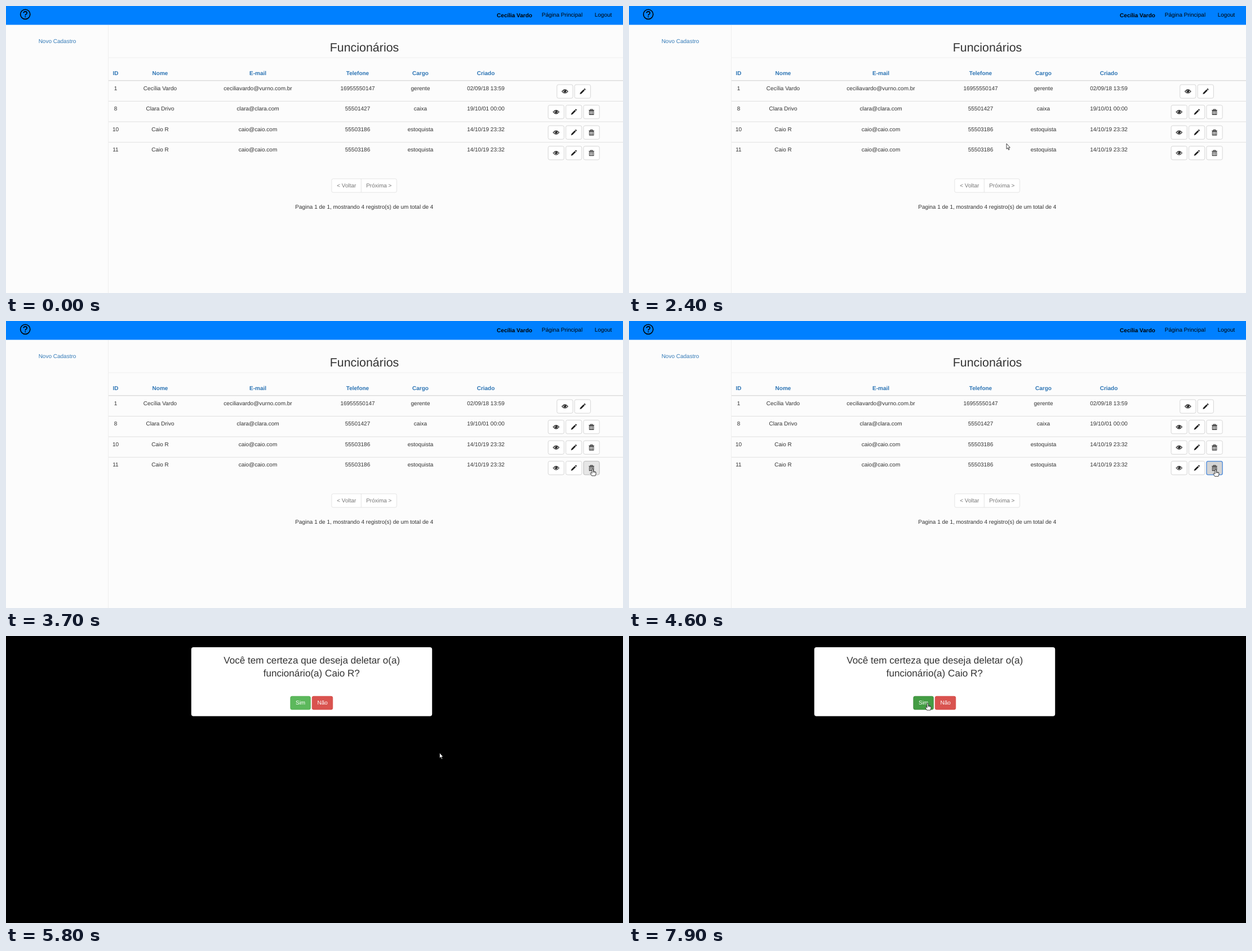
An HTML page for the animation above (8000 ms loop, 1095 px wide and 511 px high).

```html
<!DOCTYPE html>
<html lang="pt-BR">
<head>
<meta charset="utf-8">
<title>Funcionários</title>
<style>
  html, body { margin: 0; width: 100%; height: 100%; overflow: hidden; background: #fcfcfc; }
  svg { display: block; width: 1095px; height: 511px; }
  text { font: 10px "Liberation Sans", Arial, sans-serif; fill: #333; text-anchor: middle; text-rendering: geometricPrecision; }
  .bold { font-weight: bold; }
  .head { font-weight: bold; fill: #2c74b4; }
  .link { fill: #337ab7; }
  .bar { fill: #000; }
  .muted { fill: #777; }
  .light { fill: #fff; }
  .title { font-size: 21.4px; }
  .question { font-size: 17.12px; }
  .button { fill: #fff; stroke: #ccc; stroke-width: .8; }
  .button.hover { fill: #e6e6e6; stroke: #adadad; }
  .button.pressed { fill: #d4d4d4; stroke: #5b93dc; stroke-width: 1.5; }
  .yes { fill: #5cb85c; stroke: #4cae4c; stroke-width: .7; }
  .yes.hover { fill: #449d44; stroke: #398439; }
  .no { fill: #d9534f; stroke: #d43f3a; stroke-width: .7; }
  .no.hover { fill: #c9302c; stroke: #ac2925; }
  .pointer { fill: #fff; stroke: #111; stroke-width: .8; stroke-linejoin: round; }
</style>
</head>
<body>
<svg id="stage" viewBox="0 0 1095 511" xmlns="http://www.w3.org/2000/svg"></svg>
<script>
const LOOP = 8000, STEP = 100, DIALOG_AT = 4700, PRESS_AT = 4600, ENTER_AT = 600;

const columns = [194.5, 273.5, 447, 624, 735.5, 851.5];
const headings = ['ID', 'Nome', 'E-mail', 'Telefone', 'Cargo', 'Criado'];
const rows = [
  ['1', 'Cecília Vardo', 'ceciliavardo@vurno.com.br', '16955550147', 'gerente', '02/09/18 13:59'],
  ['8', 'Clara Drivo', 'clara@clara.com', '55501427', 'caixa', '19/10/01 00:00'],
  ['10', 'Caio R', 'caio@caio.com', '55503186', 'estoquista', '14/10/19 23:32'],
  ['11', 'Caio R', 'caio@caio.com', '55503186', 'estoquista', '14/10/19 23:32']
];

// Cursor stops: time, x, y
const path = [
  [600, 470, 1], [1000, 428, 172], [1100, 428, 172], [1200, 425, 193.5],
  [1500, 585, 248], [1700, 655, 245], [2300, 655, 245], [2500, 685, 245],
  [2600, 685, 245], [2700, 800, 262], [2800, 901, 273], [3000, 901, 273],
  [3100, 913.5, 274.5], [3700, 1041, 263], [3900, 1042, 263], [4100, 1041, 263],
  [4200, 1041, 264], [5200, 1041, 264], [5300, 1040, 264], [5400, 1040, 264],
  [5800, 769.5, 208], [5900, 769.5, 208], [6400, 581, 134], [6600, 581, 134],
  [6700, 580, 134], [6800, 580, 134], [6900, 572.5, 131.5], [7100, 562, 120],
  [7500, 562, 120], [7900, 530, 119.5]
];

const text = (x, y, content, cls = '') => `<text x="${x}" y="${y}" class="${cls}">${content}</text>`;
const rule = (x1, y, color, width) =>
  `<path d="M${x1} ${y}H1095" stroke="${color}" stroke-width="${width}"/>`;
const box = (x, y, w, h, cls) =>
  `<rect x="${x}" y="${y}" width="${w}" height="${h}" rx="2.8" class="${cls}"/>`;

const icons = {
  eye: `<path d="M-5.2 0Q0-6.4 5.2 0Q0 6.4-5.2 0Z" fill="none" stroke="#222" stroke-width="1.1"/>
    <circle cy="-.4" r="2.5" fill="#222"/><circle cx="-.8" cy="-1.2" r=".7" fill="#fff"/>`,
  pencil: `<path d="M-5 5L-4.1 2.1L1.6-3.6L3.6-1.6L-2.1 4.1ZM2.2-4.2L3.1-5.1Q3.7-5.5 4.3-4.9L4.9-4.3Q5.5-3.7 5.1-3.1L4.2-2.2Z" fill="#222"/>`,
  trash: `<path d="M-4.8-3.2H4.8M-1.8-3.4V-4.7H1.8V-3.4M-3.7-1.8V4.7H3.7V-1.8ZM-1.3-1V4M1.3-1V4" fill="none" stroke="#333" stroke-width="1.1"/>`
};

const actionButton = (icon, x, y) =>
  box(x, y, 28.2, 24.2, 'button') + `<g transform="translate(${x + 14.1} ${y + 12.1})">${icons[icon]}</g>`;

function tableRow(cells, i) {
  const top = 133 + i * 36.55;
  const names = i ? ['eye', 'pencil', 'trash'] : ['eye', 'pencil'];
  const left = i ? 962.2 : 977.8;
  return (i ? rule(182, top, '#ddd', .9) : '') +
    cells.map((cell, c) => text(columns[c], top + 16.7, cell)).join('') +
    names.map((name, n) => actionButton(name, left + n * 31.4, top + 7)).join('');
}

const listing = `<g id="listing">
  <rect width="1095" height="511" fill="#fcfcfc"/>
  <rect width="1095" height="33.5" fill="#0080ff"/>
  <circle cx="34.2" cy="14.8" r="8.6" fill="none" stroke="#000" stroke-width="1.6"/>
  <path d="M31.2 12.6Q31.2 9.9 34.2 9.9T37.2 12.5Q37.2 14 35.5 14.8Q34.2 15.5 34.2 17" fill="none" stroke="#000" stroke-width="1.6"/>
  <circle cx="34.2" cy="19.2" r="1" fill="#000"/>
  ${text(902.5, 19.8, rows[0][1], 'bar bold')}
  ${text(987, 18.8, 'Página Principal', 'bar')}
  ${text(1060, 18.8, 'Logout', 'bar')}
  ${text(91, 65.6, 'Novo Cadastro', 'link')}
  <path d="M181.5 34V511" stroke="#eee" stroke-width=".9"/>
  ${text(636, 81, 'Funcionários', 'title')}
  ${rule(182, 92, '#eee', .9)}
  ${headings.map((h, c) => text(columns[c], 122.6, h, 'head')).join('')}
  ${rule(182, 132.7, '#ddd', 1.5)}
  ${rows.map(tableRow).join('')}
  <rect x="577.9" y="307.7" width="115.6" height="24.2" rx="2.8" fill="#fff" stroke="#ddd" stroke-width=".8"/>
  <path d="M630.3 307.7V331.9" stroke="#ddd" stroke-width=".8"/>
  ${text(604.3, 323.2, '&lt; Voltar', 'muted')}
  ${text(661.8, 323.2, 'Próxima &gt;', 'muted')}
  ${text(635.8, 360.9, 'Pagina 1 de 1, mostrando 4 registro(s) de um total de 4')}
</g>`;

const dialog = `<g id="dialog">
  <rect width="1095" height="511" fill="#000"/>
  <rect x="328.8" y="20" width="427.4" height="122.8" rx="4" fill="#fff"/>
  <path d="M332 142.4H753" stroke="#bbb" stroke-width=".8"/>
  ${text(542.7, 48.6, 'Você tem certeza que deseja deletar o(a)', 'question')}
  ${text(542.3, 72.4, `funcionário(a) ${rows[3][1]}?`, 'question')}
  ${box(504.8, 107.3, 35.6, 23.7, 'yes')}
  ${box(543.2, 107.3, 36.6, 23.7, 'no')}
  ${text(522.6, 122.3, 'Sim', 'light')}
  ${text(561.6, 122.3, 'Não', 'light')}
</g>`;

const cursor = `<g id="cursor">
  <path id="arrow" class="pointer" d="M0 0V9.6L2.1 7.6L3.6 11.2L5 10.6L3.6 7.1H6.3Z"/>
  <g id="hand">
    <path class="pointer" d="M-1.1 .8Q0-.6 1.1 .8V4.6L4.9 5.4Q6 5.8 6 7V9L5 12.6H-1.4L-3.9 8.3Q-4 6.8-2.6 7.1L-1.1 8.4Z"/>
    <path d="M1.1 4.6V6.8M2.8 5V7M4.4 5.3V7.2" stroke="#111" stroke-width=".7"/>
  </g>
</g>`;

document.getElementById('stage').innerHTML = listing + dialog + cursor;
const part = id => document.getElementById(id);
const [listingView, dialogView, pointer, arrow, hand] =
  ['listing', 'dialog', 'cursor', 'arrow', 'hand'].map(part);
const targets = view => [...view.querySelectorAll('.button, .yes, .no')].map(el => ({
  el, x: +el.getAttribute('x'), y: +el.getAttribute('y'),
  w: +el.getAttribute('width'), h: +el.getAttribute('height')
}));
const listingTargets = targets(listingView), dialogTargets = targets(dialogView);
const show = (el, visible) => { el.style.display = visible ? '' : 'none'; };

function positionAt(t) {
  const next = path.findIndex(stop => stop[0] > t);
  if (next < 0) return path[path.length - 1].slice(1);
  if (next === 0) return path[0].slice(1);
  const [t0, x0, y0] = path[next - 1], [t1, x1, y1] = path[next];
  const k = (t - t0) / (t1 - t0);
  return [x0 + (x1 - x0) * k, y0 + (y1 - y0) * k];
}

function render(time) {
  const t = Math.floor((time % LOOP) / STEP) * STEP;
  const asking = t >= DIALOG_AT, entered = t >= ENTER_AT;
  const [x, y] = positionAt(t);
  let over = false;
  for (const { el, x: left, y: top, w, h } of asking ? dialogTargets : listingTargets) {
    const inside = entered && x >= left && x <= left + w && y >= top && y <= top + h;
    el.classList.toggle('hover', inside);
    el.classList.toggle('pressed', inside && !asking && t >= PRESS_AT);
    over = over || inside;
  }
  show(listingView, !asking);
  show(dialogView, asking);
  show(pointer, entered);
  show(arrow, !over);
  show(hand, over);
  pointer.setAttribute('transform', `translate(${x} ${y})`);
}

const start = performance.now();
function tick() {
  render(performance.now() - start);
  requestAnimationFrame(tick);
}
tick();
</script>
</body>
</html>
```
